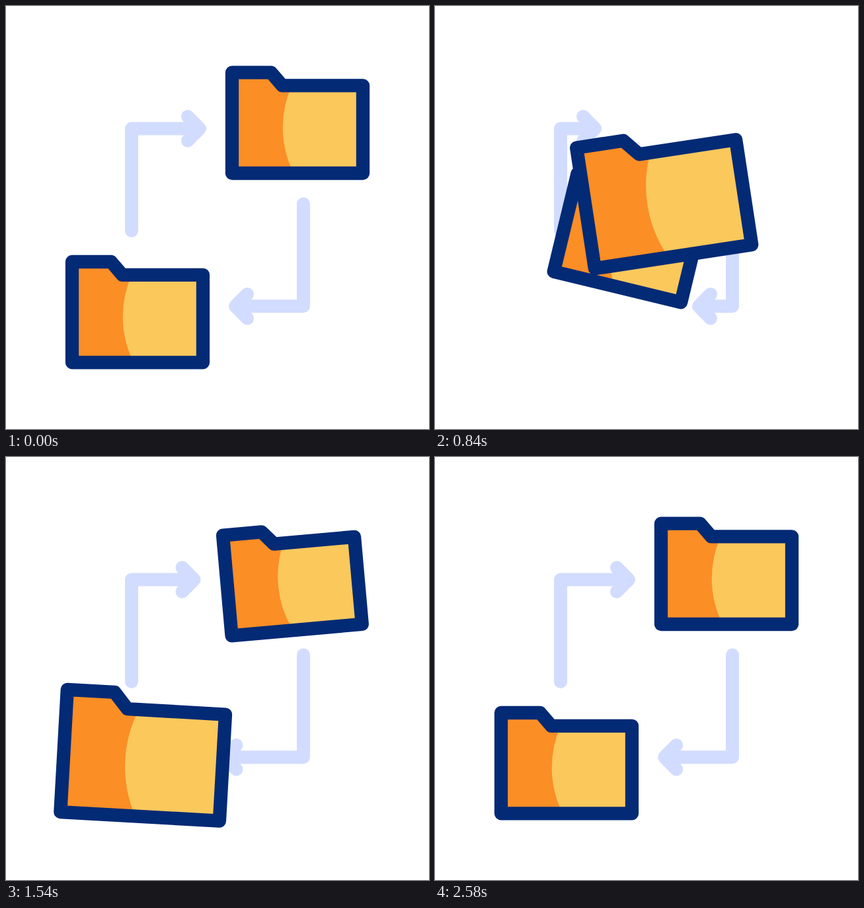
Animation of 640x640 px, one loop 3 s. Source, as an HTML page:

```html
<!DOCTYPE html>
<html lang="en">
<head>
<meta charset="utf-8">
<title>Folder exchange</title>
<style>
  html, body { margin: 0; width: 100%; height: 100%; overflow: hidden; background: #fff; }
  svg { display: block; width: 100%; height: 100%; }
  path { stroke-linecap: round; stroke-linejoin: round; stroke-width: 20; fill: none; }
  .arrow path { stroke: #d2dcfe; }
  .body { fill: #fb8e25; }
  .sheen { fill: #fbc85c; }
  .outline { stroke: #032a75; stroke-width: 20.3; vector-effect: non-scaling-stroke; }
</style>
</head>
<body>
<svg viewBox="0 0 640 640">
  <defs>
    <g id="folder">
      <path class="body" d="M-99-76.2H-40L-23-56.4H99V76.2H-99Z"/>
      <path class="sheen" d="M-8.8-56.4A155 155 0 0 0-5.8 76.2H99V-56.4Z"/>
      <path class="outline" d="M-99-76.2H-40L-23-56.4H99V76.2H-99Z"/>
    </g>
  </defs>
  <g class="arrow"><path id="upArrow"/><path id="downArrow"/></g>
  <use id="back" href="#folder"/>
  <use id="front" href="#folder"/>
</svg>
<script>
const LOOP = 3000, START = 200, ARRIVE = 1700, SETTLE = 2400;
const $ = id => document.getElementById(id);

// Smooth rise from 0 to 1 between two times.
function ramp(t, from, to) {
  const k = Math.min(1, Math.max(0, (t - from) / (to - from)));
  return k * k * (3 - 2 * k);
}

// Tilt one way while crossing, overshoot the other way, then level out.
function tilt(t) {
  const peak = 17, overshoot = 9.7, turn = 1100;
  return peak * ramp(t, START, turn)
    - (peak + overshoot) * ramp(t, turn, ARRIVE)
    + overshoot * ramp(t, ARRIVE, SETTLE);
}

// Two pulls back with a small stretch between them.
function pull(t, start, reach) {
  const swing = reach + 18, s = t - start;
  return reach * ramp(s, 0, 500) - swing * ramp(s, 500, 1100)
    + swing * ramp(s, 1100, 1600) - reach * ramp(s, 1600, 2200);
}

function placeFolder(id, x, y, angle, scale) {
  $(id).setAttribute('transform', `translate(${x} ${y}) rotate(${angle}) scale(${scale})`);
}

function drawArrow(id, x, startY, y, tip, dir) {
  const wing = tip - 18 * dir;
  $(id).setAttribute('d', `M${x} ${startY}V${y}H${tip}M${wing} ${y - 18.3}L${tip} ${y}L${wing} ${y + 18.3}`);
}

function render(t) {
  drawArrow('upArrow', 190, 340, 185.5, 293 - pull(t, 240, 56.5), 1);
  drawArrow('downArrow', 450, 299.5, 454.3, 347 + pull(t, 400, 54), -1);

  const k = ramp(t, START, ARRIVE), dx = 242 * k, dy = 286.4 * k;
  const growth = 0.217 * (ramp(t, START, 900) - ramp(t, ARRIVE, SETTLE));
  const lift = growth * k;
  placeFolder('back', 199 + dx, 463.2 - dy, tilt(t), 1);
  placeFolder('front', 441 - dx + 6 * lift, 176.8 + dy - 14 * lift, -0.635 * tilt(t), 1 + growth);
}

function tick() {
  render(performance.now() % LOOP);
  requestAnimationFrame(tick);
}
tick();
</script>
</body>
</html>
```
